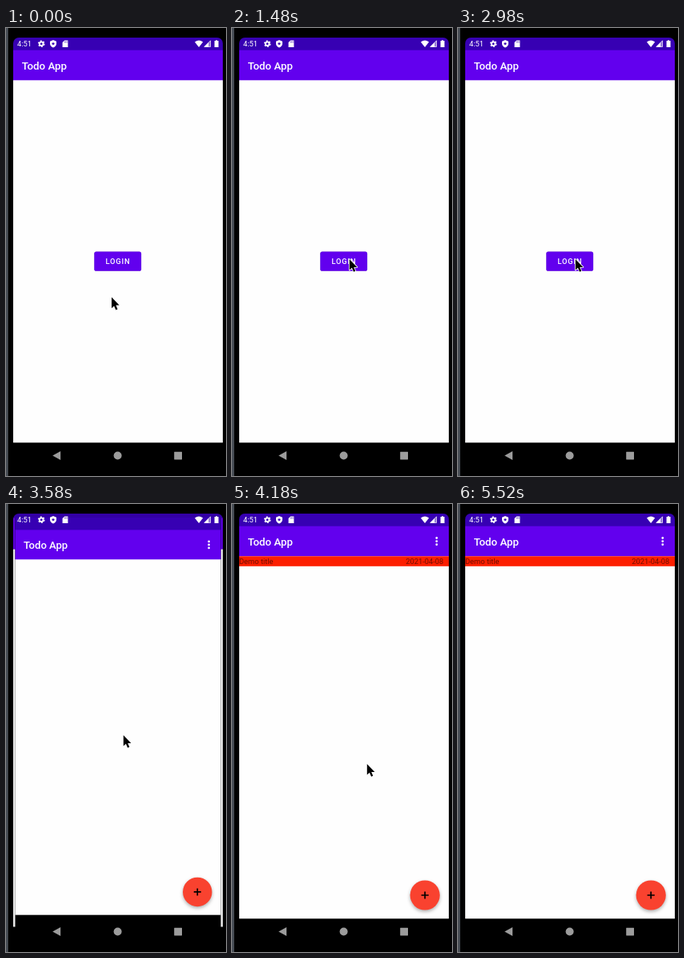
An HTML page that plays this animation: 275 by 560 pixels, repeating every 5.97 s.

```html
<!DOCTYPE html>
<html lang="en">
<head>
<meta charset="utf-8">
<title>Todo App</title>
<style>
  html, body { margin: 0; width: 100%; height: 100%; overflow: hidden; background: #000; }
  svg { display: block; width: 275px; height: 560px; font-family: Roboto, sans-serif; }
  .medium { font-weight: 500; }
  .button { filter: drop-shadow(0 .5px .5px rgba(0, 0, 0, .25)); }
  .button.raised { filter: drop-shadow(0 1.5px 1.2px rgba(0, 0, 0, .4)); }
  .fab { filter: drop-shadow(0 2.5px 2px rgba(0, 0, 0, .32)); }
</style>
</head>
<body>
<svg viewBox="0 0 275 560">
  <defs>
    <clipPath id="screen"><rect x="9" y="12" width="262" height="560" rx="7"/></clipPath>
    <clipPath id="buttonShape"><rect x="110.3" y="279.6" width="58.8" height="24.2" rx="2.6"/></clipPath>
    <linearGradient id="edge">
      <stop offset="0" stop-color="#3b4048"/>
      <stop offset=".6" stop-color="#555b64"/>
      <stop offset="1" stop-color="#16181b"/>
    </linearGradient>
    <g id="window">
      <rect x="9" y="12" width="262" height="548" fill="#000"/>
      <rect x="9" y="12" width="262" height="17" fill="#3700b3"/>
      <rect x="9" y="65" width="262" height="453.3" fill="#fefefe"/>
      <rect x="9" y="27.7" width="262" height="37.6" fill="#6200ee"/>
      <text class="medium" x="19.7" y="51.8" font-size="13.33" fill="#fff">Todo App</text>
    </g>
  </defs>

  <rect width="275" height="560" fill="#000"/>
  <rect width="3" height="560" fill="url(#edge)"/>

  <g clip-path="url(#screen)">
    <g id="login">
      <use href="#window"/>
      <g id="button" class="button">
        <rect x="110.3" y="279.6" width="58.8" height="24.2" rx="2.6" fill="#6200ee"/>
        <g clip-path="url(#buttonShape)">
          <rect id="ripple" y="279" width="62" height="26" fill="#fff" opacity=".24"/>
        </g>
        <text class="medium" x="124.5" y="295.2" font-size="9.33" letter-spacing=".83" fill="#fff">LOGIN</text>
      </g>
    </g>
    <rect id="dim" x="9" y="12" width="262" height="548" opacity=".08"/>
    <g id="list">
      <use href="#window"/>
      <g fill="#fff">
        <circle cx="255.8" cy="42.5" r="1.4"/>
        <circle cx="255.8" cy="46.6" r="1.4"/>
        <circle cx="255.8" cy="50.7" r="1.4"/>
      </g>
      <g id="row">
        <rect x="9" y="65.3" width="262" height="12.5" fill="#fd1e00"/>
        <g font-size="9.33" fill="#000" fill-opacity=".56">
          <text x="9" y="75.2">Demo title</text>
          <text x="264.3" y="75.2" text-anchor="end">2021-04-08</text>
        </g>
      </g>
      <circle class="fab" cx="241.2" cy="489" r="18.6" fill="#f9422f"/>
      <path d="M236.6 489h9.2M241.2 484.4v9.2" stroke="#000" stroke-width="1.7"/>
    </g>
  </g>

  <g fill="#fff">
    <text x="14" y="23.3" font-size="9.33">4:51</text>
    <g transform="translate(44.2 19.7)">
      <circle r="2.3" fill="none" stroke="#fff" stroke-width="1.8"/>
      <circle r="3.6" fill="none" stroke="#fff" stroke-width="1.5" stroke-dasharray="1.9 1.87"/>
    </g>
    <path d="M59 15.1l4 1.6v2.8c0 2.4-1.7 4.2-4 4.9c-2.3-.7-4-2.5-4-4.9v-2.8z"/>
    <path d="M59 17.4l.6 1.4 1.5.1-1.1 1 .4 1.5-1.4-.8-1.4.8.4-1.5-1.1-1 1.5-.1z" fill="#3700b3"/>
    <path d="M73.2 15.4h4.2v8.7h-6.8v-6.1z"/>
    <path d="M73.3 16.6v1.8M74.8 16.6v1.8M76.2 16.6v1.8" stroke="#3700b3" stroke-width=".6"/>
    <path d="M236 17.6q5.1-4 10.2 0l-5.1 6.3z"/>
    <path d="M256 15.4v8.4h-8.6z" fill-opacity=".4"/>
    <path d="M253.3 18v5.8h-5.9z"/>
    <path d="M255.6 15.8v7.6h-7.4z" fill="none" stroke="#fff" stroke-width=".7"/>
    <path d="M262.1 15.2h2v.9h1.5v8h-5v-8h1.5z"/>
  </g>
  <g fill="#9c9c9c">
    <path d="M58.2 534.5l10-5.6v11.2z"/>
    <circle cx="139.6" cy="534.5" r="5"/>
    <rect x="210.2" y="529.7" width="9.8" height="9.8" rx=".4"/>
  </g>
  <path id="cursor" d="M0 0V13.6L3.1 10.8L5.3 15.8L7.5 14.8L5.4 9.9H9.6Z"
        fill="#000" stroke="#fff" stroke-width="1.6" paint-order="stroke" stroke-linejoin="round"/>
</svg>
<script>
  const LOOP = 5970;
  const el = id => document.getElementById(id);

  // Each track holds [start ms, value...]; values stay until the next step.
  const pointer = [
    [0, 132, 336.6], [1040, 131, 336], [1190, 136, 316], [1330, 145.2, 290],
    [1480, 146.8, 289], [4180, 168.8, 325], [4330, 231.5, 471],
    [4480, 255, 514], [4630, 252, 541], [4780, -40, -40],
    [5380, 255, 558], [5520, -40, -40]
  ];
  // ripple left edge (200 = none), raised shadow
  const press = [[0, 200, 0], [2530, 114, 1], [2680, 108, 1], [2830, 200, 1], [2980, 200, 0]];
  // login scale, list scale (0 = hidden)
  const screens = [[0, 1, 0], [3580, 1.042, 0.981], [3730, 1.05, 0.998], [3880, 1, 1]];
  const rows = [[0, 0], [4180, 1]];

  const at = (track, t) => track.filter(step => step[0] <= t).pop().slice(1);
  const show = (id, on) => el(id).setAttribute("visibility", on ? "visible" : "hidden");
  const zoom = (id, s) =>
    el(id).setAttribute("transform", `translate(140 275) scale(${s}) translate(-140 -275)`);

  function draw(t) {
    const [x, y] = at(pointer, t);
    el("cursor").setAttribute("transform", `translate(${x} ${y})`);

    const [left, raised] = at(press, t);
    el("ripple").setAttribute("x", left);
    el("button").classList.toggle("raised", raised === 1);

    const [back, front] = at(screens, t);
    zoom("login", back);
    zoom("list", front || 1);
    show("list", front > 0);
    show("dim", front > 0);
    show("row", at(rows, t)[0]);
  }

  function tick() {
    draw(performance.now() % LOOP);
    requestAnimationFrame(tick);
  }
  tick();
</script>
</body>
</html>
```
